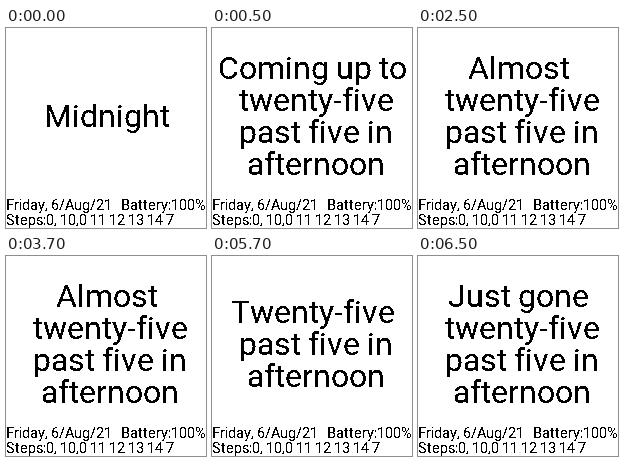
These frames come from a looping animation (200 px wide and 200 px high, 8000 ms). An HTML page with a canvas:

```html
<!DOCTYPE html>
<html lang="en">
<head>
<meta charset="utf-8">
<style>
html, body { margin: 0; width: 100%; height: 100%; overflow: hidden; background: #fff; }
canvas { display: block; }
</style>
</head>
<body>
<canvas id="face" width="200" height="200"></canvas>
<script>
const SIZE = 200, LOOP = 8000, PITCH = 32, CUTOFF = 140;
const ctx = document.getElementById('face').getContext('2d', { willReadFrequently: true });

// Later lines keep the space they were wrapped at
const phrases = [
  [0, ['Midnight']],
  [500, ['Coming up to', ' twenty-five', ' past five in', ' afternoon']],
  [2500, ['Almost', ' twenty-five', ' past five in', ' afternoon']],
  [4500, ['Twenty-five', ' past five in', ' afternoon']],
  [6500, ['Just gone', ' twenty-five', ' past five in', ' afternoon']]
];

// Whole-pixel advances, as in a bitmap font
function advance(c) {
  const w = ctx.measureText(c).width;
  return c === ' ' ? Math.floor(w) : Math.round(w);
}

function write(text, x, y) {
  for (const c of text) {
    ctx.fillText(c, x, y);
    x += advance(c);
  }
}

function writeCentred(text, mid, y) {
  const width = [...text].reduce((sum, c) => sum + advance(c), 0);
  write(text, Math.floor(mid - width / 2), y);
}

// Reduce the smooth glyph edges to pure black and white
function sharpen() {
  const img = ctx.getImageData(0, 0, SIZE, SIZE), px = img.data;
  for (let i = 0; i < px.length; i += 4) {
    px[i] = px[i + 1] = px[i + 2] = px[i + 1] < CUTOFF ? 0 : 255;
  }
  ctx.putImageData(img, 0, 0);
}

function draw(lines) {
  ctx.fillStyle = '#fff';
  ctx.fillRect(0, 0, SIZE, SIZE);
  ctx.fillStyle = '#000';

  ctx.font = '400 32px Roboto, sans-serif';
  const top = 99 - (lines.length - 1) * PITCH / 2;
  lines.forEach((s, i) => writeCentred(s, 101, top + i * PITCH));

  ctx.font = '400 14.4px Roboto, sans-serif';
  write('Friday, 6/Aug/21   Battery:100%', 0, 182);
  write('Steps:0, 10,0 11 12 13 14 7', 0, 197);
  sharpen();
}

const start = performance.now();
function loop() {
  const t = (performance.now() - start) % LOOP;
  draw(phrases.filter(p => p[0] <= t).pop()[1]);
  requestAnimationFrame(loop);
}
loop();
</script>
</body>
</html>
```
